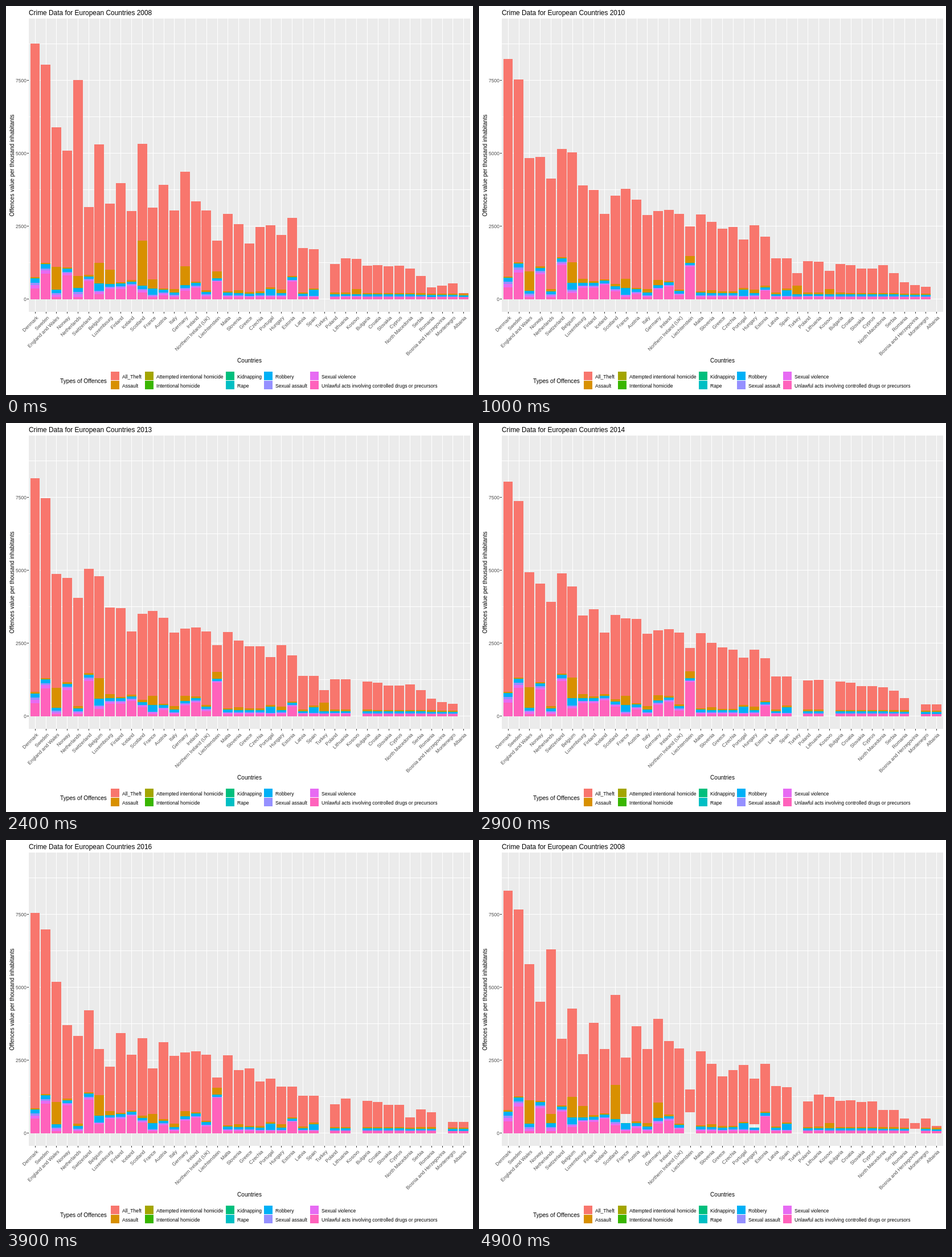
Recreate the animation shown at these times as an HTML page with a canvas. Size 820x683 px, loop 10 s.

```html
<!DOCTYPE html>
<html lang="en">
<head>
<meta charset="utf-8">
<title>Crime Data</title>
<style>
html, body { margin: 0; width: 100%; height: 100%; overflow: hidden; background: #fff; }
canvas { display: block; }
</style>
</head>
<body>
<canvas id="chart" width="820" height="683"></canvas>
<script>
const ctx = document.getElementById("chart").getContext("2d");
const FONT = '"Liberation Sans", Arial, sans-serif';
const PANEL = { left: 40, top: 22, right: 815, bottom: 537 };
const ZERO = 515;
const STEP = (PANEL.right - PANEL.left) / 41.2;
const LEGEND = [
  ["All_Theft", "#F8766D"], ["Assault", "#D89000"],
  ["Attempted intentional homicide", "#A3A500"], ["Intentional homicide", "#39B600"],
  ["Kidnapping", "#00BF7D"], ["Rape", "#00BFC4"],
  ["Robbery", "#00B0F6"], ["Sexual assault", "#9590FF"],
  ["Sexual violence", "#E76BF3"], ["Unlawful acts involving controlled drugs or precursors", "#FF62BC"]
];
const LEGEND_X = [184, 244, 386, 453, 534];
// Bar layers from the bottom up, as legend entries.
const LAYERS = [9, 8, 7, 6, 5, 1, 0];
const ASSAULT = 5, THEFT = 6;

// Bar heights in pixels: 2008, early 2010s and, where the decline is unusual, 2017.
const TOTALS = {
  "Denmark": [449, 422], "Sweden": [412, 386, 336], "England and Wales": [302, 248, 280],
  "Norway": [261, 250, 142], "Netherlands": [385, 212, 138], "Switzerland": [162, 264, 178],
  "Belgium": [272, 258, 60], "Luxembourg": [168, 200, 50], "Finland": [204, 192],
  "Iceland": [155, 150], "Scotland": [273, 182], "France": [161, 194, 50],
  "Austria": [201, 175], "Italy": [156, 148], "Germany": [224, 155], "Ireland": [172, 157],
  "Northern Ireland (UK)": [156, 150], "Liechtenstein": [103, 128, 74], "Malta": [150, 149],
  "Slovenia": [132, 136, 90], "Greece": [98, 124], "Czechia": [127, 127, 62],
  "Portugal": [130, 105], "Hungary": [113, 130, 43], "Estonia": [143, 110, 60],
  "Latvia": [90, 72], "Spain": [88, 72], "Turkey": [45, 46], "Poland": [62, 67, 38],
  "Lithuania": [72, 66], "Kosovo": [71, 50], "Bulgaria": [59, 62], "Croatia": [60, 60],
  "Slovakia": [58, 54], "Cyprus": [59, 54], "North Macedonia": [54, 60, 2],
  "Serbia": [41, 46], "Romania": [21, 30, 42], "Bosnia and Herzegovina": [24, 25],
  "Montenegro": [28, 22], "Albania": [11, 22]
};
const NAMES = Object.keys(TOTALS);

// Countries whose layers stand out; the others share one small mix.
const DRUGS = {
  "Denmark": [19], "Sweden": [45], "Norway": [42], "Switzerland": [32, 58, 48],
  "Belgium": [9], "Luxembourg": [18], "Finland": [18], "Iceland": [23], "Scotland": [12],
  "Austria": [7], "Germany": [15], "Ireland": [20], "Northern Ireland (UK)": [5],
  "Liechtenstein": [31, 55], "Estonia": [31, 13]
};
const ASSAULTS = {
  "England and Wales": [40, 34, 44], "Netherlands": [21, 4], "Belgium": [36], "Luxembourg": [25, 7],
  "Scotland": [79, 4], "France": [16], "Germany": [33, 9], "Liechtenstein": [12],
  "Turkey": [15], "Hungary": [6], "Kosovo": [9], "Italy": [6], "Slovenia": [5]
};
const HIGH_ROBBERY = ["Belgium", "France", "Portugal", "Spain"];

// Spans of years without a bar, counted from 2008 and running on into the next loop.
const ABSENT = {
  "Turkey": [5, 11], "Kosovo": [4, 8], "Albania": [1, 5], "Bosnia and Herzegovina": [5, 9]
};
// Data missing in 2017 leaves holes while the bars return to 2008.
const THEFT_FROM_ZERO = ["Liechtenstein", "Bosnia and Herzegovina"];
const ASSAULT_MISSING = ["France", "Hungary"];

const mix = (a, b, part) => a + (b - a) * part;

// A quick first change, a slowly steepening second one, then back to the start.
function trend([first, middle = first, last = middle], year) {
  if (year < 2) return mix(first, middle, year / 2);
  if (year < 9) return mix(middle, last, ((year - 2) / 7) ** 3);
  return mix(last, first, year - 9);
}

function totalAt(name, year) {
  const [first, middle, last = middle * 0.85] = TOTALS[name];
  return trend([first, middle, last], year);
}

function isAbsent(name, year) {
  const [from, to] = ABSENT[name] || [0, 0];
  return (year > from && year < to) || year + 10 < to;
}

function layersAt(name, year, total) {
  const growth = 0.9 * Math.min(year, 9 * (10 - year));
  const drugs = name in DRUGS ? trend(DRUGS[name], year) + growth : 4;
  const robbery = 2 + total * 0.01 + (HIGH_ROBBERY.includes(name) ? 7 : 0);
  const assault = trend(ASSAULTS[name] || [2.5], year);
  const others = [drugs, total * 0.014, total * 0.009, robbery, 1, assault];
  const sum = others.reduce((a, b) => a + b);
  return [...others, Math.max(0, total - sum)];
}

function isHole(name, layer, year) {
  if (year <= 9) return false;
  return (THEFT_FROM_ZERO.includes(name) && layer !== THEFT) ||
    (ASSAULT_MISSING.includes(name) && layer === ASSAULT);
}

function box(x, y, w, h, color) {
  ctx.fillStyle = color;
  ctx.fillRect(x, y, w, h);
}

function label(text, x, y, size, { color = "#000", align = "left", angle = 0 } = {}) {
  ctx.save();
  ctx.translate(x, y);
  ctx.rotate(angle);
  ctx.font = `${size}px ${FONT}`;
  ctx.textAlign = align;
  ctx.fillStyle = color;
  ctx.fillText(text, 0, 0);
  ctx.restore();
}

const centerX = i => PANEL.left + STEP * (i + 0.6);

function drawAxes() {
  const width = PANEL.right - PANEL.left, height = PANEL.bottom - PANEL.top;
  box(PANEL.left, PANEL.top, width, height, "#EBEBEB");
  for (let i = 0; i < 8; i++) {
    const y = Math.round(514.4 - 64.1 * i);
    box(PANEL.left, y, width, 1, "#fff");
    if (i % 2) continue;
    box(37, y, 3, 1, "#333");
    label(i * 1250, 36, y + 3.5, 8.5, { color: "#4D4D4D", align: "right" });
  }
  NAMES.forEach((name, i) => {
    const x = Math.floor(centerX(i));
    box(x, PANEL.top, 1, height, "#fff");
    box(x, PANEL.bottom, 1, 3, "#333");
    label(name, x + 6, 548, 8.6, { color: "#4D4D4D", align: "right", angle: -Math.PI / 4 });
  });
  label("Countries", 427.5, 625.5, 10, { align: "center" });
  label("Offences value per thousand inhabitants", 14, 280, 10, { align: "center", angle: -Math.PI / 2 });
}

function drawLegend() {
  label("Types of Offences", 95, 662, 10.2);
  LEGEND.forEach(([text, color], i) => {
    const x = LEGEND_X[i >> 1], y = 642 + 16 * (i % 2);
    box(x, y, 15, 15, color);
    label(text, x + 20, y + 11.5, 8.6);
  });
}

function drawBar(name, i, year) {
  if (isAbsent(name, year)) return;
  const left = Math.floor(centerX(i) - STEP * 0.45 + 0.2);
  const right = Math.floor(centerX(i) + STEP * 0.45 + 0.2);
  const rising = year > 9 && THEFT_FROM_ZERO.includes(name);
  const scale = rising ? year - 9 : 1;
  const total = totalAt(name, rising ? 0 : year);
  let height = 0, bottom = 0;
  layersAt(name, rising ? 0 : year, total).forEach((size, layer) => {
    height = Math.min(height + size, total);
    const top = Math.round(height * scale);
    if (!isHole(name, layer, year)) {
      box(left, ZERO - top, right - left, top - bottom, LEGEND[LAYERS[layer]][1]);
    }
    bottom = top;
  });
}

// Ten steps a second; each year is held for two, and the last pose waits for the loop.
function yearAt(time) {
  const step = Math.min(49, Math.floor((time % 10000) / 100));
  if (step < 5) return step / 5;
  return Math.floor(step / 5) + Math.max(0, step % 5 - 1) / 4;
}

function draw(time) {
  const year = yearAt(time);
  box(0, 0, 820, 683, "#fff");
  drawAxes();
  NAMES.forEach((name, i) => drawBar(name, i, year));
  drawLegend();
  label(`Crime Data for European Countries ${2008 + Math.round(year) % 10}`, 40, 15.5, 11.9);
}

const start = performance.now();
function frame() {
  draw(performance.now() - start);
  requestAnimationFrame(frame);
}
frame();
</script>
</body>
</html>
```
